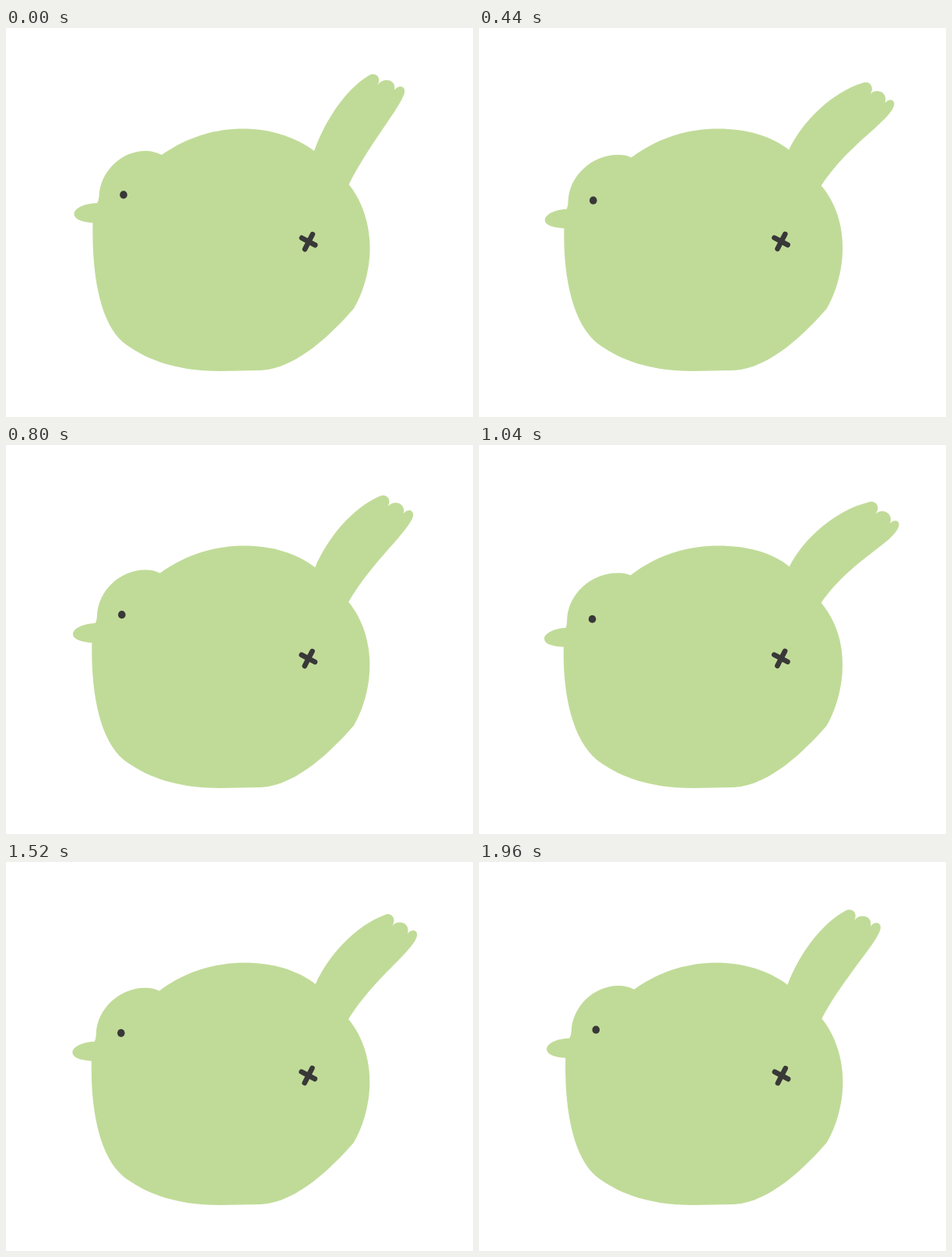
An HTML page that plays this animation: 600 px wide and 500 px high, repeating every 2 s.

```html
<!DOCTYPE html>
<html lang="en">
<head>
<meta charset="utf-8">
<title>Bird</title>
<style>
  html, body { margin: 0; width: 100%; height: 100%; overflow: hidden; background: #fff; }
  svg { display: block; width: 100vw; height: 100vh; }
</style>
</head>
<body>
<svg viewBox="0 0 600 500">
  <g fill="#c0db98">
    <path id="tail"/>
    <path id="torso"/>
    <path id="head"/>
  </g>
  <ellipse id="eye" rx="4.8" ry="5.1" fill="#383838"/>
  <path id="cross" fill="none" stroke="#383838" stroke-width="6.6" stroke-linecap="round"/>
</svg>
<script>
  const LOOP = 2000;
  const STEP = 40;
  // The pose swings evenly between raised (0) and lowered (1) at these moments.
  const TURNS = [0, 340, 680, 1010, 1340, 1680, 2000];

  // Each part has a raised and a lowered path with matching commands.
  const PARTS = {
    tail: [
      `M396 158 C409 122 434 80 467 60.5 C474 56.5 483 63 477.5 73
       C485 63 502 66 499 80 C504 72 515 74 511.5 85
       C505 104 465 152 440.5 201 L400 205 Z`,
      `M399 156 C419 118 462 84 503 75 C512 71 520 80 513 90
       C521 82 536 89 531 103 C536 97 545 99 541.5 108
       C532 130 478 149 439.5 203 L400 205 Z`
    ],
    torso: [
      `M200 163 C230 142 265 129.5 305 129.5 C338 129.5 370 139 396 158
       L440.5 201 C457.5 222 467.5 252 467.5 283 C467.5 313 458 342 446.5 361
       C420 391 375 437 328 440 L275 441 C223 441 182 428.5 150.5 404
       C121 379 110 318 111.5 250 Z`,
      `M194 168 C226 143 265 129.5 308 129.5 C345 129.5 377 138 399 156
       L439.5 203 C457 224 467 250 467 283 C467 313 457.5 342 446.5 361
       C420 391 375 437 328 440 L275 441 C223 441 182 428.5 150.5 404
       C119 377 107 318 108.5 260 Z`
    ],
    head: [
      `M111.5 250.5 C98 249.5 87.5 246 87.5 239 C87.5 232 100 225.5 117 225
       Q119 222 119.5 217 C120.5 184 149 157.5 180 158
       C187 158 194 160 200 163 L220 250 Z`,
      `M108.5 260.5 C94 259.5 83.5 257 83.5 250 C83.5 243.5 95 237 111 236
       Q112.5 232 112.5 226 C113 192 145 164.5 179 165.2
       C186 165.2 190 166 194 168 L220 260 Z`
    ],
    cross: [
      "M393.8 265.2 L384 284.2 M380 269.8 L397.2 279",
      "M393 264.9 L383.3 283.7 M379.2 269.6 L396.4 278.6"
    ]
  };

  const find = id => document.getElementById(id);
  const lerp = (a, b, p) => a + (b - a) * p;

  function blend([from, to], p) {
    const ends = to.match(/[\d.]+/g);
    let i = 0;
    return from.replace(/[\d.]+/g, n => lerp(+n, +ends[i++], p).toFixed(2));
  }

  function poseAt(time) {
    const next = TURNS.findIndex(turn => turn > time);
    const start = TURNS[next - 1];
    const part = (time - start) / (TURNS[next] - start);
    return next % 2 ? part : 1 - part;
  }

  function draw(ms) {
    const time = Math.floor((ms % LOOP + 0.5) / STEP) * STEP % LOOP;
    const p = poseAt(time);
    for (const id in PARTS) find(id).setAttribute("d", blend(PARTS[id], p));
    find("eye").setAttribute("cx", lerp(151, 145, p));
    find("eye").setAttribute("cy", lerp(214.4, 224.7, p));
  }

  const begin = performance.now();
  function tick(now) {
    draw(Math.max(0, now - begin));
    requestAnimationFrame(tick);
  }
  draw(0);
  requestAnimationFrame(tick);
</script>
</body>
</html>
```
